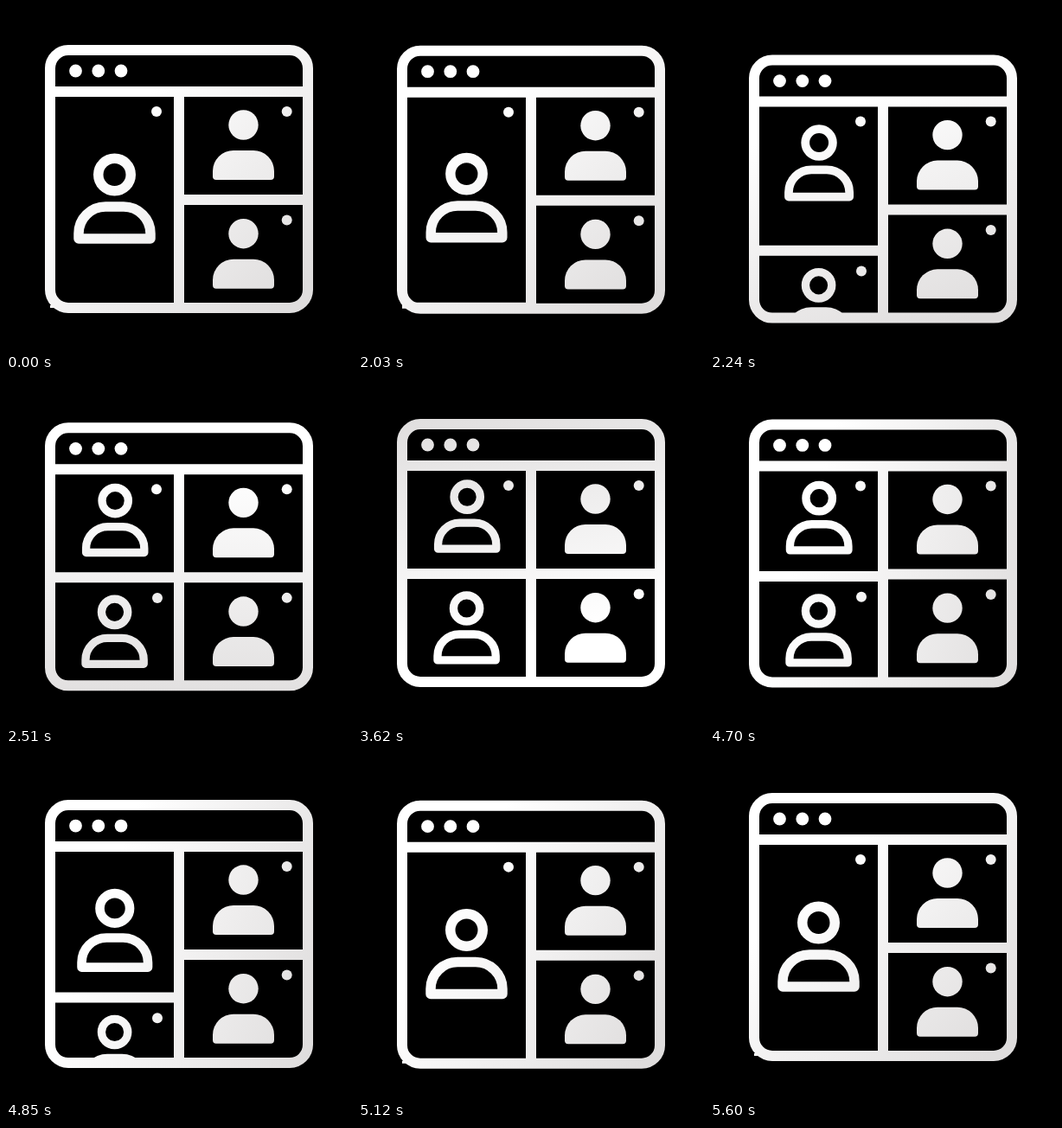
Recreate the animation shown at these times as an HTML page. Size 400 by 400 pixels, loop 5.63 s.

```html
<!DOCTYPE html>
<html lang="en">
<head>
<meta charset="utf-8">
<title>Video call layout</title>
<style>
html, body { margin: 0; width: 100%; height: 100%; overflow: hidden; background: #000; }
svg { display: block; width: 100vw; height: 100vh; }
.line { fill: none; stroke: #fff; stroke-width: 12; stroke-linejoin: round; }
.user { fill: none; stroke: #fff; stroke-width: 11.5; stroke-linejoin: round; }
.solid { fill: #fff; }
</style>
</head>
<body>
<svg viewBox="0 0 400 400">
  <defs>
    <linearGradient id="shade" gradientUnits="userSpaceOnUse">
      <stop offset="0.25" stop-color="#fff"/>
      <stop offset="1" stop-color="#dfdddd"/>
    </linearGradient>
    <clipPath id="pane"><rect x="51" y="99" width="149" height="250"/></clipPath>
    <g id="outlined" class="user">
      <circle r="18.75"/>
      <path d="M-41.5 74V68A31 31 0 0 1 -10.5 37H10.5A31 31 0 0 1 41.5 68V74Z"/>
    </g>
    <g id="filled" class="solid">
      <circle cx="274.5" cy="137.5" r="17.2"/>
      <path d="M239 191a24 24 0 0 1 24-24h23a24 24 0 0 1 24 24v6a4 4 0 0 1-4 4h-63a4 4 0 0 1-4-4z"/>
    </g>
    <mask id="art" maskUnits="userSpaceOnUse" x="0" y="0" width="400" height="400">
      <g id="win">
        <rect class="line" x="51" y="51" width="298" height="298" rx="21"/>
        <path class="line" d="M51 99H349M200 99V349M200 224H349"/>
        <g class="solid">
          <circle cx="80.5" cy="75" r="7.4"/>
          <circle cx="106.8" cy="75" r="7.4"/>
          <circle cx="133" cy="75" r="7.4"/>
          <circle id="dotA" cx="174" cy="122" r="6"/>
          <circle id="dotB" cx="324.7" cy="122" r="6"/>
          <circle cx="324.7" cy="247.5" r="6"/>
        </g>
        <use href="#filled"/>
        <use href="#filled" y="125.7"/>
        <use id="host" href="#outlined"/>
        <g clip-path="url(#pane)">
          <g id="guest">
            <path class="line" d="M51 224H200"/>
            <use href="#outlined" transform="translate(125.6 264) scale(.81)"/>
            <circle id="dotC" class="solid" cx="175" cy="247.7" r="6"/>
          </g>
        </g>
      </g>
    </mask>
  </defs>
  <rect width="400" height="400" fill="url(#shade)" mask="url(#art)"/>
</svg>
<script>
const LOOP = 5630, STEP = 30, PHASE = 20;
const SPLIT = 1980, NUDGE = 3700, MERGE = 4660;
const $ = id => document.getElementById(id);
const clamp = x => Math.min(1, Math.max(0, x));
const lerp = (a, b, p) => a + (b - a) * p;
const wave = x => Math.sin(Math.PI / 2 * clamp(x)) ** 2;
const bump = (t, start, len, size) => size * Math.sin(Math.PI * clamp((t - start) / len)) ** 2;

// Cubic Bezier easing (.4, 0, .2, 1)
function ease(x) {
  x = clamp(x);
  let lo = 0, hi = 1;
  for (let i = 0; i < 20; i++) {
    const u = (lo + hi) / 2, v = 1 - u;
    if (1.2 * v * v * u + 0.6 * v * u * u + u ** 3 < x) lo = u; else hi = u;
  }
  return 3 * (1 - lo) * lo * lo + lo ** 3;
}

// Direction of the shaded side, in degrees clockwise from up
const turns = [[0, 135], [SPLIT, 135], [2510, 180], [2900, 350], [NUDGE, 350],
  [4070, 455], [4160, 465], [MERGE, 465], [5600, 495], [LOOP, 495]];
function angle(t) {
  const i = turns.findIndex(k => k[0] > t);
  const [a, b] = [turns[i - 1], turns[i]];
  return lerp(a[1], b[1], (t - a[0]) / (b[0] - a[0]));
}

const blinks = {
  dotA: [[4790, 4970], [5270, 5450]],
  dotB: [[3830, 4040], [4310, 4520]],
  dotC: [[3140, 3320], [3620, 3800]]
};

function draw(t) {
  const drop = bump(t, SPLIT, 660, 13) + bump(t, NUDGE, 450, 4) + bump(t, MERGE, 660, 13);
  $("win").setAttribute("transform", `translate(0 ${drop})`);

  const merging = t >= MERGE, d = t - (merging ? MERGE : SPLIT);
  const toggle = p => merging ? p : 1 - p;
  const big = toggle(ease(d / 490)), away = toggle(wave(d / 445));
  $("host").setAttribute("transform",
    `translate(${lerp(126.2, 125.5, big)} ${lerp(135.2, 195, big)}) scale(${lerp(0.81, 1, big)})`);
  $("guest").setAttribute("transform", `translate(0 ${128 * away})`);

  for (const id in blinks) {
    const off = blinks[id].some(([a, b]) => t >= a && t < b);
    $(id).setAttribute("visibility", off ? "hidden" : "visible");
  }

  const r = angle(t) * Math.PI / 180, x = 190 * Math.sin(r), y = -190 * Math.cos(r);
  const ends = { x1: 200 - x, y1: 200 - y, x2: 200 + x, y2: 200 + y };
  for (const k in ends) $("shade").setAttribute(k, ends[k]);
}

const start = performance.now();
function tick() {
  const t = (performance.now() - start) % LOOP;
  draw(Math.max(0, Math.floor((t - PHASE) / STEP) * STEP + PHASE));
  requestAnimationFrame(tick);
}
tick();
</script>
</body>
</html>
```
